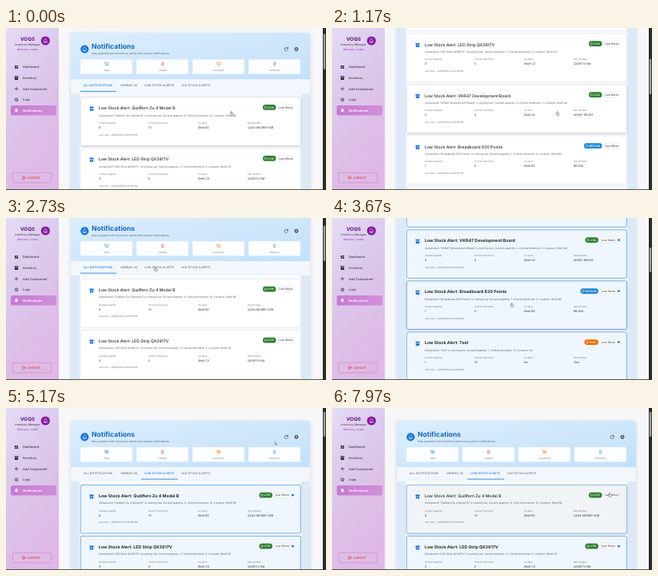
An HTML page that plays this animation: 400x203 px, repeating every 8 s.

```html
<!DOCTYPE html>
<html lang="en">
<head>
<meta charset="utf-8">
<title>Notifications</title>
<style>
  html, body { margin: 0; width: 100%; height: 100%; overflow: hidden; background: #f7f7f9; }
  svg { display: block; width: 100vw; height: 100vh; }
  text { font-family: Inter, "Open Sans", sans-serif; text-rendering: geometricPrecision; white-space: pre; }
  .line { fill: none; stroke-linecap: round; stroke-linejoin: round; }
</style>
</head>
<body>
<svg id="stage" viewBox="0 0 400 203" preserveAspectRatio="none"></svg>
<script>
const LOOP = 8000;
const BLUE = '#1976d2', RED = '#d32f2f', ORANGE = '#ed6c02', GREEN = '#2e7d32', INK = '#25262b', GREY = '#6c6f75';
const CARD_TOP = 96.5, CARD_STEP = 64, CARD_HEIGHT = 60.5;
const ALL_COUNT = 12, LOW_COUNT = 18;
const TAB_CLICK = 2900, READ_CLICK = 7300;

// time, scroll offset
const scrollSteps = [[0, 9.5], [630, 188], [800, 236], [980, 236], [1480, 20], [3300, 20],
  [3750, 250], [3930, 230], [4200, 121], [4470, 0], [LOOP, 0]];
// time, x, y
const pointerSteps = [[0, 282, 107], [1750, 282, 107], [2600, 187, 64], [2950, 187, 64], [3300, 225, 109],
  [4480, 225, 109], [5170, 337, 44], [5500, 350, 37], [6200, 350, 37], [7100, 358, 109],
  [7450, 358, 109], [7850, 347, 109], [LOOP, 347, 109]];

const levels = { LOW: [GREEN, 16.5], MEDIUM: ['#1e88d2', 22.5], HIGH: [ORANGE, 17.5] };
const items = [
  ['Quillfern Zu 4 Model B', 8, 10, 'Shelf B2', 'QZU4-MODBP-4GB', 'LOW'],
  ['LED Strip QX3917V', 3, 5, 'Shelf C3', 'QX3917V-5M', 'LOW'],
  ['VKR47 Development Board', 2, 3, 'Shelf A2', 'VKR47-DEVKIT', 'LOW'],
  ['Breadboard 830 Points', 1, 2, 'Shelf B3', 'BB-830', 'MEDIUM'],
  ['Test', 1, 10, 'bin', 'Test', 'HIGH'],
  ['Jumper Wire Set', 4, 6, 'Shelf A1', 'JW-120', 'LOW']
];

const rect = (x, y, w, h, fill, more = '') => `<rect x="${x}" y="${y}" width="${w}" height="${h}" fill="${fill}" ${more}/>`;
const circle = (x, y, r, fill, more = '') => `<circle cx="${x}" cy="${y}" r="${r}" fill="${fill}" ${more}/>`;
const path = (d, fill, more = '') => `<path d="${d}" fill="${fill}" ${more}/>`;
const line = (d, stroke, width = 0.6) => `<path class="line" d="${d}" stroke="${stroke}" stroke-width="${width}"/>`;
const at = (x, y, body, scale = 1) => `<g transform="translate(${x} ${y}) scale(${scale})">${body}</g>`;
// y is the vertical middle of the capitals
const text = (x, y, size, fill, body, weight = 400, more = '') =>
  `<text x="${x}" y="${y + size * 0.36}" font-size="${size}" fill="${fill}" font-weight="${weight}" ${more}>${body}</text>`;
const middle = (x, y, size, fill, body, weight) => text(x, y, size, fill, body, weight, 'text-anchor="middle"');

const BELL = 'M-2.2 1.5L-1.5 .7V-.6C-1.5 -1.7 -.9 -2.2 -.3 -2.4C-.3 -3 .3 -3 .3 -2.4C.9 -2.2 1.5 -1.7 1.5 -.6V.7L2.2 1.5ZM-.6 1.9H.6C.5 2.7 -.5 2.7 -.6 1.9Z';
const bell = path(BELL, '#fff');
const bellOutline = line(BELL, '#fff', 0.5);
const crate = fill => path('M-2.6 -2.6H2.6V-1.1H-2.6ZM-2.2 -.7H2.2V2.6H-2.2ZM-.9 .1V.7H.9V.1Z', fill, 'fill-rule="evenodd"');

function gear() {
  let teeth = '';
  for (let a = 0; a < 360; a += 45) teeth += `<g transform="rotate(${a})">${rect(-0.5, -2.6, 1, 1.2, '#444')}</g>`;
  return teeth + circle(0, 0, 1.5, 'none', 'stroke="#444" stroke-width="1"');
}

function sidebar() {
  const icons = [
    path('M-2.2 -2.2H-.3V.3H-2.2ZM.3 -2.2H2.2V-.8H.3ZM.3 -.3H2.2V2.2H.3ZM-2.2 .8H-.3V2.2H-2.2Z', INK),
    crate(INK),
    line('M-2 0H2M0 -2V2', INK, 0.7),
    circle(0, 0, 2, 'none', `stroke="${INK}" stroke-width=".7"`) + line('M0 -1.1V.2L.9 .7', INK),
    bell
  ];
  const menu = ['Dashboard', 'Inventory', 'Add Component', 'Logs', 'Notifications'].map((label, i) => {
    const y = 49 + i * 13.6, active = i === 4;
    return at(13, y, icons[i], 0.95) + text(21, y, 3.95, active ? '#fff' : INK, label, active ? 600 : 400);
  }).join('');
  return rect(0, 0, 66, 203, 'url(#side)') +
    middle(27, 13.3, 6.2, '#5e1787', 'VOQS', 700) +
    middle(27, 20.3, 3.55, '#41344c', 'Inventory Manager') +
    middle(27, 27, 3.2, '#9c27b0', 'Welcome, orvelin') +
    circle(49.3, 16, 5.6, '#871a9f') + at(49.3, 16, bellOutline) +
    rect(6, 97, 57, 12.4, 'url(#pill)', 'rx="2"') + menu +
    rect(8.3, 181.3, 48.4, 12.6, 'none', 'rx="1.6" stroke="#d17fb4" stroke-width=".6"') +
    at(22.5, 187.6, line('M0 -1.7H-1.8V1.7H0M-.6 0H2M1.1 -.9L2 0L1.1 .9', RED, 0.55)) +
    text(27, 187.6, 3.7, RED, 'LOGOUT', 500);
}

function header() {
  return rect(81, 16, 299, 1300, '#dceaf8', 'rx="3" filter="url(#soft)"') +
    path('M81 74V19Q81 16 84 16H377Q380 16 380 19V74Z', 'url(#head)') +
    rect(81, 74, 299, 18, '#f1f7fd') +
    rect(92, 92, 277, 1220, '#f6fafd') +
    circle(98.3, 36.3, 5.1, BLUE) + at(98.3, 36.3, bellOutline) +
    text(107, 33.2, 8.6, '#1668bd', 'Notifications', 700) +
    text(107, 41.3, 3.48, '#5f6c79', 'Stay updated with inventory alerts and system notifications') +
    at(350.3, 36.3, line('M1.6 -1.3A2.1 2.1 0 1 0 2.1 .4M2 -2.3V-.9H.6', '#444', 0.65)) +
    at(363, 36.3, gear()) +
    line('M93 89.6H368', '#d9e2ea', 0.3);
}

function stats(count) {
  return [['Total', count, BLUE], ['Unread', 0, RED], ['Low Stock', count, ORANGE], ['Old Stock', 0, '#0288d1']]
    .map(([label, value, color], i) => {
      const x = 93 + i * 70;
      return rect(x, 49, 65, 18.6, '#fcfdff', 'rx="1.5" stroke="#d3e0ec" stroke-width=".3"') +
        middle(x + 32.5, 55.2, 5.8, color, value) + middle(x + 32.5, 63, 2.9, GREY, label);
    }).join('');
}

function tabs(active) {
  return [['ALL NOTIFICATIONS', 97, 45], ['UNREAD (0)', 143, 30], ['LOW STOCK ALERTS', 173, 46], ['OLD STOCK ALERTS', 219, 47]]
    .map(([label, x, w], i) => {
      const on = i === active;
      return text(x, 82, 3.55, on ? BLUE : '#686d74', label, 500, 'letter-spacing=".07"') +
        (on ? rect(x - 4, 88.7, w, 0.8, BLUE) : '');
    }).join('');
}

function card([name, quantity, limit, place, part, level], unread, stamp, index) {
  const [color, width] = levels[level];
  const right = unread ? 355.5 : 360;
  const chip = right - 22.5 - width;
  const fields = [['Current Quantity', quantity], ['Critical Threshold', limit], ['Location', place], ['Part Number', part]];
  const body = rect(93.3, 0, 275, CARD_HEIGHT, unread ? '#eff6fd' : '#fff',
      `class="face" rx="1.6" stroke="${unread ? '#4a91d9' : '#d7dade'}" stroke-width="${unread ? 0.7 : 0.45}"`) +
    at(107, 14.5, crate(BLUE)) +
    text(116, 13.7, unread ? 5.25 : 5.1, INK, 'Low Stock Alert: ' + name, unread ? 700 : 500) +
    text(116, 22.8, 3.25, '#55595f', `Component "${name}" is running low. Current quantity: ${quantity}. Critical threshold: ${limit}. Location: ${place}`) +
    fields.map(([label, value], i) => text(116 + i * 62, 32, 2.8, GREY, label) + text(116 + i * 62, 37.9, 3.45, INK, value)).join('') +
    text(116, 46.8, 2.9, GREY, 'Just now • 4/9/2025 at ' + stamp) +
    rect(chip, 9.3, width, 6.8, color, 'rx="3.4"') +
    circle(chip + 3.4, 12.7, 1.3, 'none', 'stroke="#fff" stroke-width=".5"') +
    text(chip + 6, 12.7, 3.4, '#fff', level, 500) +
    rect(right - 20.5, 9.3, 20.5, 6.8, '#fff', 'rx="3.4" stroke="#c6cace" stroke-width=".35"') +
    middle(right - 10.25, 12.7, 3.5, INK, 'Low Stock') +
    (unread ? circle(358.4, 12.7, 1.4, BLUE) : '');
  return `<g class="card" transform="translate(0 ${CARD_TOP + index * CARD_STEP})">${body}</g>`;
}

function view(id, count, active, unread, stamp) {
  let cards = '';
  for (let i = 0; i < count; i++) cards += card(items[i % items.length], unread, stamp, i);
  return `<g id="${id}">${stats(count)}${tabs(active)}${cards}</g>`;
}

const gradient = (id, coords, ...colors) => `<linearGradient id="${id}" ${coords}>` +
  colors.map((c, i) => `<stop offset="${i / (colors.length - 1)}" stop-color="${c}"/>`).join('') + '</linearGradient>';

const stage = document.getElementById('stage');
stage.innerHTML = `<defs>
  ${gradient('side', 'x1="0" y1="0" x2=".4" y2="1"', '#e6dcf5', '#dccdee', '#dcc1e8', '#dfb9e6')}
  ${gradient('pill', 'x1="0" x2="1"', '#c67ad2', '#d08fd9')}
  ${gradient('head', 'x1="0" y1="0" x2="1" y2="1"', '#dceefd', '#c3e0fa')}
  <filter id="soft" x="-5%" y="-5%" width="110%" height="110%" color-interpolation-filters="sRGB"><feDropShadow dx="0" dy="1" stdDeviation="2" flood-color="#8fa9c4" flood-opacity=".4"/></filter>
  <filter id="lift" x="-5%" y="-10%" width="110%" height="130%" color-interpolation-filters="sRGB"><feDropShadow dx="0" dy=".8" stdDeviation="1" flood-opacity=".22"/></filter>
  </defs>
  ${rect(66, 0, 330, 203, '#f7f7f9')}
  <g id="page">${header()}${view('all', ALL_COUNT, 0, false, '4:45:19 PM')}${view('low', LOW_COUNT, 2, true, '5:45:46 PM')}
    <g id="read">${card(items[0], false, '5:45:46 PM', 0)}</g></g>
  ${sidebar()}
  ${rect(396, 0, 4, 203, '#2b2b2d')}
  <rect id="thumb" x="396.8" width="2.4" rx="1.2" fill="#9b9b9d"/>
  ${rect(0, 202.2, 400, 0.8, '#2b2b2d')}
  <g id="pointer">
    <g id="hand" transform="scale(.85)">${path('M-.8 -2.4C-.8 -3.2 .3 -3.2 .3 -2.4V-.5L2 -.1Q2.6 .1 2.5 .8L2.1 2.8H-.9L-2.4 .8C-2.7 .3 -2 -.1 -1.5 .3L-.8 .9Z', '#fff', 'stroke="#222" stroke-width=".5" stroke-linejoin="round"')}</g>
    <g id="arrow" transform="scale(.85)">${path('M-1 -2V2.2L0 1.3L.7 2.8L1.4 2.5L.7 1.1H2Z', '#fff', 'stroke="#222" stroke-width=".45" stroke-linejoin="round"')}</g>
  </g>`;

const el = id => document.getElementById(id);
const show = (id, on) => el(id).setAttribute('visibility', on ? 'visible' : 'hidden');
const move = (id, x, y) => el(id).setAttribute('transform', `translate(${x} ${y})`);
const linear = u => u, smooth = u => u * u * (3 - 2 * u);

function sample(steps, t, ease) {
  const next = Math.max(1, steps.findIndex(step => step[0] > t));
  const [from, ...a] = steps[next - 1], [to, ...b] = steps[next];
  const u = ease((t - from) / (to - from));
  return a.map((value, i) => value + (b[i] - value) * u);
}

const cardsIn = id => [...document.querySelectorAll(`#${id} .card`)];
const cards = { all: cardsIn('all'), low: cardsIn('low'), read: cardsIn('read') };
const readFace = document.querySelector('#read .face');
readFace.setAttribute('fill', '#f1f4f7');
readFace.setAttribute('stroke', '#78aadd');
readFace.setAttribute('stroke-width', 0.7);
let lifted = null;

function scrollThumb(scroll, count) {
  const arrow = 5, track = 203 - 2 * arrow;
  const ratio = track / (CARD_TOP + count * CARD_STEP + 15);
  el('thumb').setAttribute('y', arrow + scroll * ratio);
  el('thumb').setAttribute('height', 203 * ratio);
}

function render(t) {
  const [scroll] = sample(scrollSteps, t, linear);
  const [x, y] = sample(pointerSteps, t, smooth);
  const low = t >= TAB_CLICK, read = t >= READ_CLICK;
  move('page', 0, -scroll);
  show('all', !low);
  show('low', low);
  show('read', read);
  cards.low[0].setAttribute('visibility', read ? 'hidden' : 'inherit');
  scrollThumb(scroll, low ? LOW_COUNT : ALL_COUNT);

  const offset = y + scroll - CARD_TOP, index = Math.floor(offset / CARD_STEP);
  const inside = index >= 0 && offset - index * CARD_STEP < CARD_HEIGHT;
  const target = inside ? (read ? cards.read : low ? cards.low : cards.all)[index] : null;
  if (target !== lifted) {
    lifted?.querySelector('.face').removeAttribute('filter');
    target?.querySelector('.face').setAttribute('filter', 'url(#lift)');
    lifted = target;
  }

  const pageY = y + scroll;
  const onTab = pageY > 74 && pageY < 90 && x < 262;
  const onButton = Math.abs(x - 350) < 5 && Math.abs(pageY - 36) < 5;
  const hand = inside || onTab || onButton;
  move('pointer', x, y);
  show('hand', hand);
  show('arrow', !hand);
}

const start = performance.now();
function tick() {
  render((performance.now() - start) % LOOP);
  requestAnimationFrame(tick);
}
tick();
</script>
</body>
</html>
```
